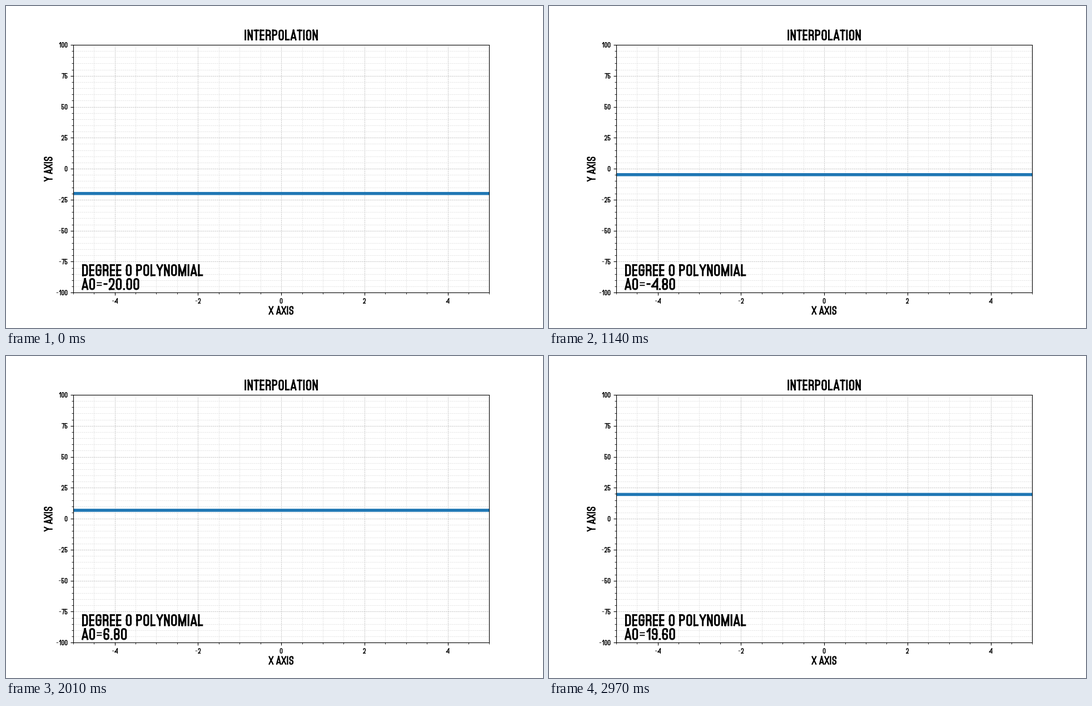
Recreate the animation shown at these times as a matplotlib script. Size 966x580 px, loop 3000 ms.

```python
import matplotlib.pyplot as plt
import numpy as np
from matplotlib.animation import FuncAnimation
from matplotlib.patches import PathPatch
from matplotlib.path import Path
from matplotlib.ticker import MultipleLocator
from matplotlib.transforms import Affine2D

W, H, DPI = 966, 580, 100
FRAMES, INTERVAL = 100, 30
BLUE = "#1f77b4"

# Condensed capitals drawn as strokes with rounded corners; sizes in em.
CAP, STROKE, THIN, RADIUS = 0.70, 0.102, 0.06, 0.13

# Key points of a letter cell, named like a compass.
SW, S, SE = (0, 0), (.5, 0), (1, 0)
WSW, ESE = (0, .25), (1, .25)
WEST, MID, EAST = (0, .5), (.5, .5), (1, .5)
WNW, ENE = (0, .75), (1, .75)
NW, N, NE = (0, 1), (.5, 1), (1, 1)

STEM, POST = [SW, NW], [SE, NE]
TOP, WAIST, BASE = [NW, NE], [WEST, EAST], [SW, SE]
RING = [WEST, NW, NE, SE, SW, WEST]
BOWL = [NW, NE, EAST, WEST]


def bar(y, inset=0):
    return [(inset, y), (1 - inset, y)]


GLYPHS = {
    "A": [[SW, N], [SE, N], bar(.2, .2)],
    "D": [STEM, [NW, NE, SE, SW]],
    "E": [STEM, TOP, WAIST, BASE],
    "G": [[ENE, NE, NW, SW, SE, EAST], [EAST, MID]],
    "I": [STEM],
    "L": [STEM, BASE],
    "M": [STEM, POST, [NW, S], [NE, S]],
    "N": [STEM, POST, [NW, SE]],
    "O": [RING],
    "P": [STEM, BOWL],
    "R": [STEM, BOWL, [WEST, EAST, SE]],
    "S": [[ENE, NE, NW, WEST, EAST, SE, SW, WSW]],
    "T": [TOP, [S, N]],
    "X": [[SW, NE], [NW, SE]],
    "Y": [[NW, MID], [NE, MID], [S, MID]],
    "0": [RING],
    "1": [POST, [WNW, NE]],
    "2": [[WNW, NW, NE, EAST, SW], BASE],
    "3": [[WNW, NW, NE, EAST, MID], [MID, EAST, SE, SW, WSW]],
    "4": [POST, [WSW, ESE], [NE, WSW]],
    "5": [TOP, [NW, WEST], [WEST, EAST, SE, SW, WSW]],
    "6": [[ENE, NE, NW, SW, SE, EAST, WEST]],
    "7": [TOP, [NE, S]],
    "8": [[WNW, NW, NE, EAST, WEST, WNW], [WSW, WEST, EAST, SE, SW, WSW]],
    "9": [[WSW, SW, SE, NE, NW, WEST, EAST]],
    ".": [BASE],
    "-": [WAIST],
    "\u2212": [WAIST],
    "=": [bar(.37), bar(.63)],
    " ": [],
}
THIN_CHARS, POINTED = "=\u2212", "ATXY47"


def advance(ch):
    """Widths fall into a few classes."""
    for chars, width in ((" I.", .19), ("1-", .31), ("ELT7\u2212", .375), ("M", .55)):
        if ch in chars:
            return width
    return .42


def rounded(points):
    """Polyline whose inner corners are replaced by curves."""
    p = np.array(points, float)
    verts, codes = [p[0]], [Path.MOVETO]
    for a, b, c in zip(p, p[1:], p[2:]):
        u, v = a - b, c - b
        lu, lv = np.hypot(*u), np.hypot(*v)
        r = min(RADIUS, lu / 2, lv / 2)
        verts += [b + u / lu * r, b, b + v / lv * r]
        codes += [Path.LINETO, Path.CURVE3, Path.CURVE3]
    return Path(verts + [p[-1]], codes + [Path.LINETO])


def text_paths(s):
    """Return (heavy strokes, thin strokes, width) of one line of text."""
    heavy, thin, x = [], [], 0
    for ch in s:
        width = advance(ch)
        inset = (.01 if ch in POINTED else .039) + STROKE / 2
        for stroke in GLYPHS[ch]:
            pts = [(x + inset + px * (width - 2 * inset),
                    STROKE / 2 + py * (CAP - STROKE)) for px, py in stroke]
            (thin if ch in THIN_CHARS else heavy).append(rounded(pts))
        x += width
    return heavy, thin, x


def join(paths):
    return Path.make_compound_path(*paths) if paths else Path(np.empty((0, 2)))


class Label:
    """Text in stage pixels, y counted downwards to the baseline."""

    def __init__(self, s, size, x, y, align=0.5, angle=0):
        self.em, self.x, self.y = size * DPI / 72, x, y
        self.align, self.angle = align, angle
        self.parts = []
        for weight in (STROKE, THIN):
            patch = PathPatch(join([]), fill=False, ec="black", lw=weight * size,
                              capstyle="projecting", joinstyle="miter", snap=False)
            fig.add_artist(patch)
            self.parts.append(patch)
        self.set(s)

    def set(self, s):
        heavy, thin, width = text_paths(s)
        place = (Affine2D().translate(-self.align * width, 0).scale(self.em)
                 .rotate_deg(self.angle).translate(self.x, H - self.y))
        for patch, paths in zip(self.parts, (heavy, thin)):
            patch.set_path(place.transform_path(join(paths)))
            patch.set_transform(Affine2D().scale(1 / DPI) + fig.dpi_scale_trans)


# Plot box in pixels; the 10:6 layout is a touch shorter than the stage.
LAYOUT_H = 0.6 * W
LEFT, BOTTOM = 0.125 * W, 0.11 * LAYOUT_H
BOX_W, BOX_H = 0.775 * W, 0.77 * LAYOUT_H

fig = plt.figure(figsize=(W / DPI, H / DPI), dpi=DPI, facecolor="white")
ax = fig.add_axes([LEFT / W, BOTTOM / H, BOX_W / W, BOX_H / H])
ax.set(xlim=(-5, 5), ylim=(-100, 100))
for axis, major, minor in ((ax.xaxis, 2, 0.5), (ax.yaxis, 25, 5)):
    axis.set_major_locator(MultipleLocator(major))
    axis.set_minor_locator(MultipleLocator(minor))
ax.tick_params(which="both", labelbottom=False, labelleft=False)
ax.grid(which="major", color="#b4b4b4", ls="--", lw=0.5)
ax.grid(which="minor", color="#dcdcdc", ls="--", lw=0.5)


def stage(x, y):
    """Data point to stage pixels."""
    return LEFT + BOX_W * (x + 5) / 10, H - BOTTOM - BOX_H * (y + 100) / 200


def tick_text(v):
    return str(v).replace("-", "\u2212")


for v in range(-4, 5, 2):
    Label(tick_text(v), 10, stage(v, 0)[0], 536)
for v in range(-100, 101, 25):
    Label(tick_text(v), 10, 111, stage(0, v)[1] + 4.9, align=1)

cx, cy = stage(0, 0)
Label("INTERPOLATION", 20, cx, 62)
Label("X AXIS", 16, cx, 556)
Label("Y AXIS", 16, 83.7, cy + 0.5, angle=90)
text_x = stage(-4.8, 0)[0]
Label("DEGREE 0 POLYNOMIAL", 22, text_x, 486.5, align=0)
value = Label("A0=0.00", 22, text_x, 511.5, align=0)

line, = ax.plot([-5, 5], [0, 0], color=BLUE, lw=4, snap=False)


def update(i):
    a0 = round(-20 + 0.4 * i, 2) + 0.0
    line.set_ydata([a0, a0])
    value.set(f"A0={a0:.2f}")
    return line, *value.parts


anim = FuncAnimation(fig, update, frames=FRAMES, interval=INTERVAL,
                     repeat=True, repeat_delay=0, blit=False)
plt.show()
```
